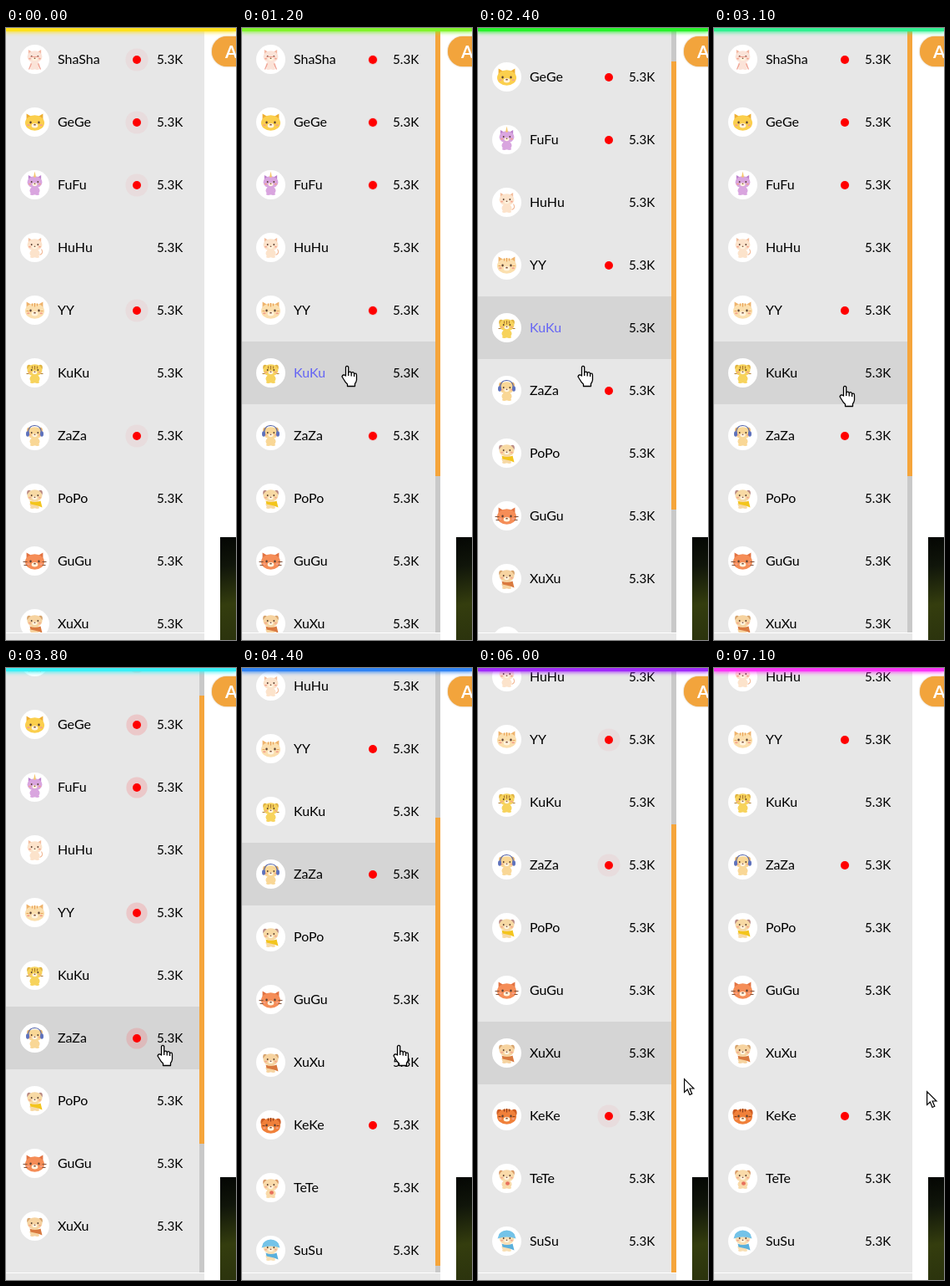
Recreate the animation shown at these times as an HTML page. Size 276 by 732 pixels, loop 7.2 s.

```html
<!DOCTYPE html>
<html lang="en">
<head>
<meta charset="utf-8">
<title>Channel list</title>
<style>
  html, body { margin: 0; width: 100%; height: 100%; overflow: hidden; background: #fff; }
  body { position: relative; font: 16px/74px Lato, sans-serif; color: #000; }
  body div, body svg, span { position: absolute; }
  #side { left: 0; top: 0; width: 237.5px; height: 732px; background: #e7e7e7; }
  #view { left: 0; top: 0; width: 237.5px; height: 723px; overflow: hidden; border-bottom: 1.5px solid #fff; }
  #list { left: 0; top: 0; width: 237.5px; }
  .row { left: 0; width: 237.5px; height: 75px; }
  .row.on { background: #d5d5d5; }
  .row.link .name { color: #6565f4; }
  .name { left: 62px; }
  .count { left: 181px; font-size: 15.2px; }
  .face { left: 17px; top: 20px; width: 35px; height: 35px; }
  .dot { left: 152px; top: 33px; width: 10px; height: 10px; border-radius: 50%; background: #f00; box-shadow: 0 0 0 var(--spread) rgba(255, 60, 70, var(--alpha)); }
  #track { right: 0; top: 0; width: 5.5px; height: 723px; background: #c9c9c9; }
  #thumb { top: 0; width: 5.5px; height: 536px; background: #f5a53b; }
  #pill { left: 247px; top: 10px; width: 90px; height: 36px; border-radius: 18px; background: #f2a43c; box-shadow: 0 0 2px #c9a06a; }
  #pill span { left: 16px; font: bold 21px/36px Lato, sans-serif; color: #fff; }
  #photo { left: 257px; top: 609px; width: 19px; height: 123px; background: linear-gradient(170deg, #040603, #10150a 28%, #343d0e 65%, #2b330d); }
  #bar { left: 0; top: 0; width: 276px; height: 4px; }
  #hand, #arrow { left: 0; top: 0; overflow: visible; }
</style>
</head>
<body>
<div id="side"></div>
<div id="view">
  <div id="list"></div>
  <div id="track"><div id="thumb"></div></div>
</div>
<div id="pill"><span>A</span></div>
<div id="photo"></div>
<div id="bar"></div>
<svg id="hand" width="20" height="27" fill="#fff" stroke="#000" stroke-width="1.3" stroke-linejoin="round">
  <path d="M-1.5 12V1.5Q0-.8 1.7 1.5V8Q4 6 5.2 8.5Q8 6.5 8.6 9.5Q11.5 8 11.5 11.5V17Q11 20 9.5 21.5V24.5H.5V22Q-2 20-3.500 17L-6 13Q-5 9.500-1.500 12Z"/>
  <path d="M1.7 7V12M5.2 8.5V12.5M8.6 9.5V13" fill="none"/>
</svg>
<svg id="arrow" width="14" height="21" fill="#fff" stroke="#000" stroke-width="1.2">
  <path d="M.6.6V16.5L4.4 13L7 19.5L9.800 18.3L7.1 12H12Z"/>
</svg>
<script>
const LOOP = 7200, STEP = 100, ROW = 75, VIEW = 723;
const $ = id => document.getElementById(id);

const oval = (x, y, rx, ry, fill) => `<ellipse cx="${x}" cy="${y}" rx="${rx}" ry="${ry}" fill="${fill}"/>`;
const path = (d, fill, stroke = 'none') => `<path d="${d}" fill="${fill}" stroke="${stroke}" stroke-width="1.2"/>`;
const stripes = color => path('M-3-8V-5M0-8.500V-4M3-8V-5M-10 1H-7M10 1H7', 'none', color);
const headset = path('M-8-2Q-8-12 0-12Q8-12 8-2', 'none', '#5363a8') + oval(-8.5, -2, 2, 3.2, '#5d72bd') + oval(8.5, -2, 2, 3.2, '#5d72bd');
const scarf = color => path('M-6 3Q0 6 7 3L9 11L4 9L-5 7Z', color);
const pointed = color => path('M-9-2L-9-10L-2-6Z M9-2L9-10L2-6Z', color);
const floppy = color => oval(-8, -4, 3, 4, color) + oval(8, -4, 3, 4, color);

// name, live, fur, ears, sitting, extra drawing
const channels = [
  ['ShaSha', 1, '#fbe3d8', pointed('#f3b7a2'), 1, path('M-7 12L-4 5M7 12L4 5M-5-3H5', 'none', '#ef9f90')],
  ['GeGe', 1, '#fbcf4d', pointed('#eeae33'), 0, ''],
  ['FuFu', 1, '#d9a5df', pointed('#bd82cd'), 1, path('M-1.500-9L0-16L1.500-9Z', '#f5c66b')],
  ['HuHu', 0, '#fce3cb', pointed('#f3bd9d'), 1, path('M6 9Q11 7 8 2', 'none', '#f3bd9d')],
  ['YY', 1, '#fbdfae', pointed('#efb36c'), 0, stripes('#e9a257')],
  ['KuKu', 0, '#f7d35c', floppy('#e0b443'), 1, stripes('#ad7b32')],
  ['ZaZa', 1, '#f9d796', floppy('#e4b068'), 1, headset],
  ['PoPo', 0, '#f7d9a4', floppy('#b98983'), 1, scarf('#f3c51d')],
  ['GuGu', 0, '#f58d57', pointed('#e27342'), 0, path('M-14 1H-9M-13 5H-9M14 1H9M13 5H9', 'none', '#80503a')],
  ['XuXu', 0, '#f6d3a0', floppy('#d6a36d'), 1, scarf('#d9793f')],
  ['KeKe', 1, '#f0803a', floppy('#cf5e25'), 0, stripes('#8c3d1c')],
  ['TeTe', 0, '#f9daa9', floppy('#d99a68'), 1, oval(1, 6, 2.5, 2.2, '#e8715c')],
  ['SuSu', 0, '#f8dfb4', floppy('#7ec5e6'), 1, path('M-11-3Q-9-13 0-13Q9-13 11-3Q0-7-11-3Z', '#74c3e8') + scarf('#5ab0dc')],
];

function avatar(fur, ears, sits, extra) {
  const head = ears + oval(0, 0, 10.5, 8.5, fur) + oval(0, 3, 3.5, 2.5, '#fff4df')
    + oval(-4.5, -.5, 1.1, 1.3, '#5b4033') + oval(4.5, -.5, 1.1, 1.3, '#5b4033')
    + oval(0, 2, 1.2, .8, '#80503a') + oval(-7, 2.5, 1.6, 1, '#f4a28c') + oval(7, 2.5, 1.6, 1, '#f4a28c');
  const body = sits ? oval(0, 7, 6, 5, fur) + oval(-3, 11, 2.5, 1.5, fur) + oval(3, 11, 2.5, 1.5, fur) : '';
  return `<svg class="face" viewBox="-17.5 -17.5 35 35">${oval(0, 0, 17.5, 17.5, '#fff')}${body}`
    + `<g transform="${sits ? 'translate(0 -3) scale(.85)' : 'translate(0 1) scale(1.1)'}">${head}</g>${extra}</svg>`;
}

$('list').innerHTML = channels.map(([name, live, ...look], i) =>
  `<div class="row" style="top:${i * ROW}px">${avatar(...look)}<span class="name">${name}</span>`
  + `${live ? '<div class="dot"></div>' : ''}<span class="count">5.3K</span></div>`).join('');
const rows = [...$('list').children];

const smooth = p => p * p * (3 - 2 * p);
const linear = p => p;

// Keys are [time, ...values]
function track(keys, t, ease = smooth) {
  const next = keys.findIndex(k => k[0] > t);
  if (next < 0) return keys.at(-1).slice(1);
  if (next === 0) return keys[0].slice(1);
  const a = keys[next - 1], b = keys[next];
  const p = ease((t - a[0]) / (b[0] - a[0]));
  return a.slice(1).map((v, i) => v + (b[i + 1] - v) * p);
}

const glow = [[0, 253, 224, 28], [1200, 130, 244, 44], [2400, 40, 242, 44], [3800, 58, 240, 246],
  [4900, 42, 42, 242], [6000, 160, 42, 250], [7100, 250, 52, 246]];
const pointer = [[300, 290, 470], [900, 126, 404], [2800, 126, 404], [3400, 188, 451],
  [5700, 188, 451], [6050, 250, 493], [6400, 255, 506]];
const scroll = [[1400, 0], [1950, 252], [2050, 252], [2550, 0], [3600, 0], [3800, 45], [4500, 252]];
// The hovered row stays put while the wheel turns
const wheel = [[1400, 2700], [3600, 5100]];

function draw(t) {
  const color = `rgb(${track(glow, t, linear).map(Math.round)})`;
  $('bar').style.background = color;
  $('bar').style.boxShadow = `0 0 5px 1px ${color}`;

  const [x, y] = track(pointer, t).map(Math.round);
  const inside = x < 237, hovering = x < 250;
  $('hand').style.display = inside ? '' : 'none';
  $('arrow').style.display = inside ? 'none' : '';
  $(inside ? 'hand' : 'arrow').style.transform = `translate(${x}px,${y}px)`;

  const top = Math.round(track(scroll, t)[0]);
  $('list').style.transform = `translateY(${-top}px)`;
  $('track').style.display = hovering ? '' : 'none';
  $('thumb').style.top = top * VIEW / (rows.length * ROW) + 'px';

  const turn = wheel.find(([from, to]) => t >= from && t < to);
  const hovered = Math.floor((y + track(scroll, turn ? turn[0] : t)[0]) / ROW);
  rows.forEach((row, i) => {
    const on = hovering && i === hovered;
    row.classList.toggle('on', on);
    row.classList.toggle('link', on && x < 150);
  });

  const pulse = (t + 1000) % 2000 / 1000;
  $('list').style.setProperty('--spread', 8.5 * smooth(Math.min(pulse, 1)) + 'px');
  $('list').style.setProperty('--alpha', Math.max(0, Math.min(.18, .06 + (1 - pulse) * .6)));
}

function tick() {
  draw(Math.floor(performance.now() % LOOP / STEP) * STEP);
  requestAnimationFrame(tick);
}
tick();
</script>
</body>
</html>
```
